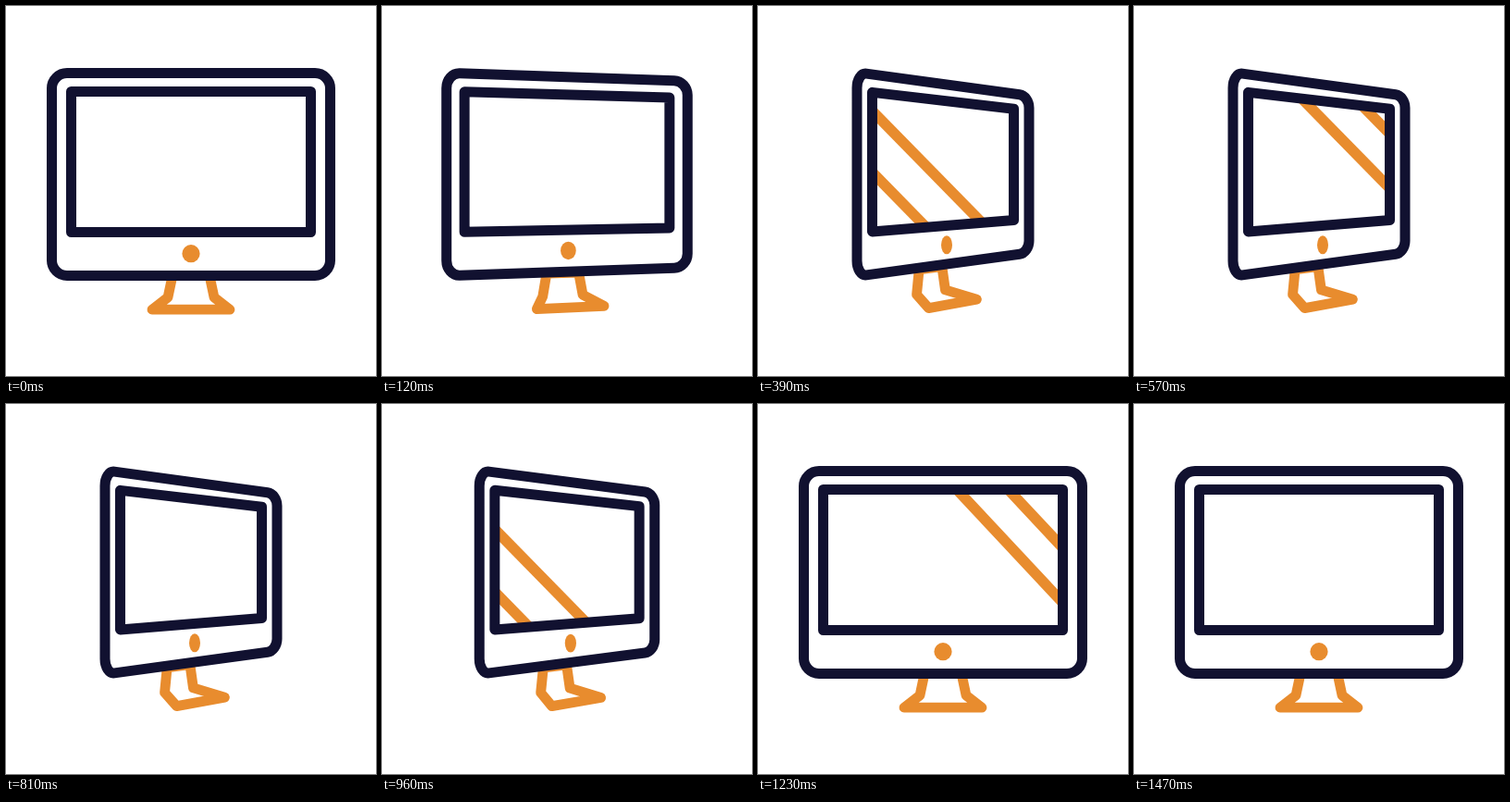
An HTML page with a canvas for the animation above (3620 ms loop, 400 by 400 pixels).

```html
<!DOCTYPE html>
<html>
<head>
<meta charset="utf-8">
<style>
  html, body { margin: 0; width: 100%; height: 100%; overflow: hidden; background: #fff; }
  canvas { display: block; }
</style>
</head>
<body>
<canvas id="stage" width="400" height="400"></canvas>
<script>
const ctx = document.getElementById('stage').getContext('2d');
const LOOP = 3620, STEP = 30, NAVY = '#111130', ORANGE = '#e88c2e';
const CX = 200, EYE = 182; // turning axis and eye level

const mix = (a, b, k) => a + (b - a) * k;
const ramp = (t, start, length) => Math.min(1, Math.max(0, (t - start) / length));
const smooth = u => u * u * (3 - 2 * u);

// Turns a point about the vertical axis: widths shrink, the right side recedes.
const turn = (x, y, p, squeeze = 0.382) => [
  CX + (x - CX) * (1 - squeeze * p),
  EYE + (y - EYE) * (1 - p * (x - 58) * 0.00077)
];

function stroke(color, width = 11) {
  ctx.strokeStyle = color;
  ctx.lineWidth = width;
  ctx.stroke();
}

// Traces a turned rectangle, symmetric about the axis, with corner radius r.
function tracePanel(half, top, bottom, r, p, squeeze) {
  const q = r * 0.45;
  ctx.beginPath();
  for (const [sx, sy] of [[-1, -1], [1, -1], [1, 1], [-1, 1]]) {
    const x = CX + sx * half, y = sy < 0 ? top : bottom;
    const at = (dx, dy) => turn(x - sx * dx, y - sy * dy, p, squeeze);
    const arc = [at(0, r), at(0, q), at(q, 0), at(r, 0)];
    if (sx !== sy) arc.reverse();
    ctx.lineTo(...arc[0]);
    ctx.bezierCurveTo(...arc[1], ...arc[2], ...arc[3]);
  }
  ctx.closePath();
}

function drawStand(p) {
  // half width, height, and the shift caused by depth
  const side = [[20, 291.5, -13.5, 3.7], [25, 315, -13, 9], [42, 328.2, 10.5, 9.7]];
  const corner = (sign, [half, y, dx, dy]) => {
    const [px, py] = turn(CX + sign * half, y, p);
    return [px + dx * p, py + dy * p];
  };
  ctx.beginPath();
  side.forEach(s => ctx.lineTo(...corner(-1, s)));
  side.reverse().forEach(s => ctx.lineTo(...corner(1, s)));
  ctx.closePath();
  stroke(ORANGE, 10.8);
}

// Two diagonal glints cross the screen from lower left to upper right.
function drawGlints(t, start, p) {
  const u = ramp(t, start, 630);
  if (u === 0 || u === 1) return;
  const s = 1 - (1 - u) ** 1.3;
  const trail = mix(-81, 343, s), gap = mix(72, 49, s);
  const slope = mix(0.935, 0.98, p);
  for (const x of [trail, trail + gap]) {
    ctx.beginPath();
    ctx.moveTo(x - 40 * slope, 60);
    ctx.lineTo(x + 200 * slope, 300);
    stroke(ORANGE, 11.5);
  }
}

function draw(t) {
  const p = smooth(ramp(t, 0, 300)) - smooth(ramp(t, 935, 240));
  ctx.fillStyle = '#fff';
  ctx.fillRect(0, 0, 400, 400);
  ctx.lineJoin = 'round';

  drawStand(p);
  tracePanel(150.5, 72.5, 291.5, 16.5, p);
  stroke(NAVY);

  const traceScreen = () => tracePanel(129.5, 92.5, 244.5, 0, p, 0.409);
  ctx.save();
  traceScreen();
  ctx.clip();
  drawGlints(t, 240, p);
  drawGlints(t, 840, p);
  ctx.restore();
  traceScreen();
  stroke(NAVY);

  const [x, y] = turn(CX, 267.7, p);
  ctx.beginPath();
  ctx.ellipse(x + 4 * p, y, mix(9.6, 6, p), mix(9.6, 10, p), 0, 0, 2 * Math.PI);
  ctx.fillStyle = ORANGE;
  ctx.fill();
}

const begin = performance.now();
function tick() {
  const t = (performance.now() - begin) % LOOP;
  draw(Math.floor(t / STEP) * STEP);
  requestAnimationFrame(tick);
}
tick();
</script>
</body>
</html>
```
